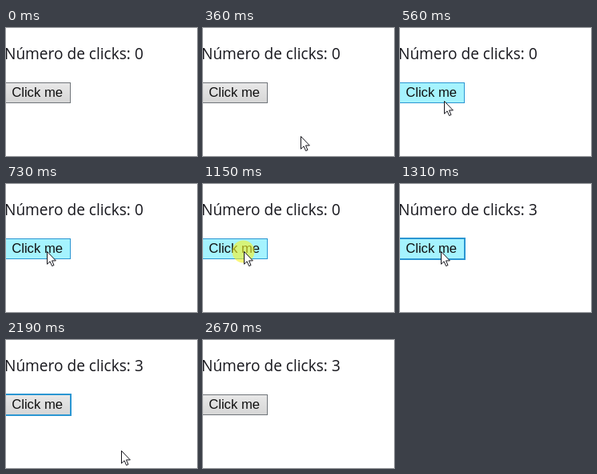
Write an HTML page that moves like this. It is 239 by 160 pixels and loops after 2.88 s.

```html
<!DOCTYPE html>
<html lang="es">
<head>
<meta charset="utf-8">
<title>Número de clicks</title>
<style>
  html, body { margin: 0; width: 100%; height: 100%; overflow: hidden; background: #fff; }
  svg { display: block; width: 100vw; height: 100vh; }
  #label { font: 19.1px "Open Sans", "Noto Sans", sans-serif; fill: #16161c; }
  #caption { font: 16.67px "Liberation Sans", Arial, sans-serif; fill: #101010; }
  #button { fill: url(#gray); stroke: #70757a; }
  #button.focus { stroke: #2b96d2; }
  #button.hover { fill: #a5f3fe; stroke: #2b96d2; }
</style>
</head>
<body>
<svg viewBox="0 0 239 160">
  <linearGradient id="gray" x2="0" y2="1">
    <stop stop-color="#e8e8e8"/>
    <stop offset="1" stop-color="#d6d6d6"/>
  </linearGradient>
  <text id="label" x="-2" y="39">Número de clicks: <tspan id="count">0</tspan></text>
  <rect id="button"/>
  <text id="caption" x="7.2" y="86">Click me</text>
  <circle id="halo" cx="50.5" cy="84.5" r="14" fill="#f4f228" fill-opacity=".62"/>
  <path id="cursor" d="M.5 .5V16.2L4.1 12.8L6.6 18.5L9 17.5L6.5 11.9H11.4Z"
        fill="#fff" stroke="#15151c" stroke-linejoin="round"/>
</svg>
<script>
const LOOP = 2880, STEP = 20;
const ENTER = 320, REST = 730, PRESS = 1150, COUNT = 1250, RELEASE = 1310;
const LEAVE = 2070, GONE = 2230, BLUR = 2670;

const $ = id => document.getElementById(id);
const count = $('count'), button = $('button'), halo = $('halo'), cursor = $('cursor');

const within = (t, from, to) => t >= from && t < to;
const show = (el, on) => { el.style.display = on ? '' : 'none'; };

// progress from one time to another, in whole steps
const progress = (t, from, to) =>
  Math.floor((t - from) / STEP) * STEP / (to - from);

// tip of the pointer: slows down onto the button, rests, speeds away
function pointer(t) {
  if (!within(t, ENTER, GONE)) return null;
  if (t < REST) {
    const left = 1 - progress(t, ENTER, REST);
    return [51 + 105 * left ** 3.8, 84 + 66 * left ** 2.5].map(Math.round);
  }
  if (t < LEAVE) return [51, 84];
  const away = progress(t, LEAVE, GONE - STEP) ** 1.4;
  return [55 + 110 * away, 86 + 65 * away].map(Math.round);
}

function paintButton(hover, focus) {
  const w = focus ? 2 : 1, grow = w - 1;
  const box = {
    x: -2 + w / 2, y: 68 - grow + w / 2,
    width: 83 + grow - w, height: 26 + 2 * grow - w, 'stroke-width': w
  };
  for (const name in box) button.setAttribute(name, box[name]);
  button.classList.toggle('hover', hover);
  button.classList.toggle('focus', focus);
}

function draw(t) {
  const tip = pointer(t);
  show(cursor, tip);
  if (tip) cursor.setAttribute('transform', `translate(${tip})`);

  const n = t < COUNT ? 0 : Math.min(3, 1 + Math.floor((t - COUNT) / 30));
  count.textContent = n;
  show(halo, within(t, PRESS, RELEASE));

  const hover = !!tip && tip[0] < 81 && within(tip[1], 68, 94);
  paintButton(hover, within(t, COUNT, BLUR));
}

const start = performance.now();
function tick() {
  draw((performance.now() - start) % LOOP);
  requestAnimationFrame(tick);
}
tick();
</script>
</body>
</html>
```
